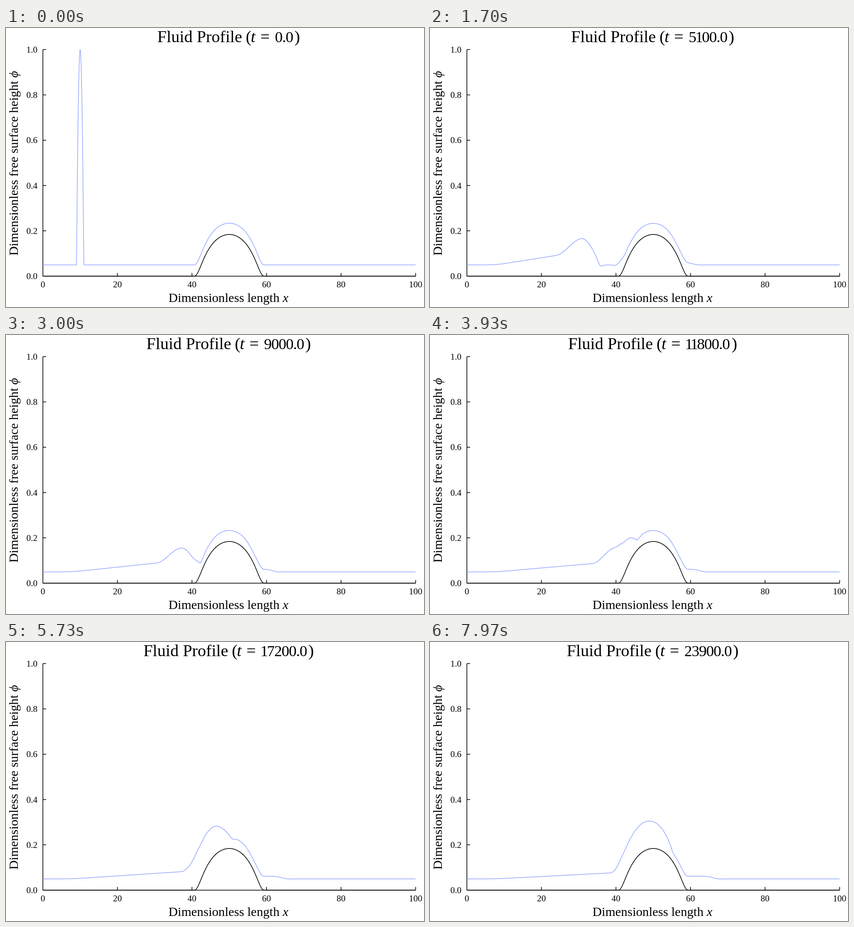
Recreate the animation shown at these times as an HTML page. Size 917x611 px, loop 8000 ms.

```html
<!DOCTYPE html>
<html lang="en">
<head>
<meta charset="utf-8">
<title>Fluid Profile</title>
<style>
html, body { margin: 0; width: 100%; height: 100%; overflow: hidden; background: #fff; }
svg { display: block; width: 100vw; height: 100vh; }
text { font-family: "Liberation Serif", "Noto Serif", serif; white-space: pre; }
.tick { font-size: 19.5px; }
.label { font-size: 28.2px; }
.title { font-size: 36.6px; }
.number { font-size: 34px; letter-spacing: -1px; }
.math { font-style: italic; }
path { fill: none; stroke: #000; stroke-width: 1.5; stroke-linejoin: round; }
#film { stroke: #99acff; }
</style>
</head>
<body>
<svg viewBox="0 0 917 611">
  <path id="axes"/>
  <path id="film"/>
  <path id="bed"/>
  <g id="ticks"></g>
  <text class="label" x="356.5" y="600">Dimensionless length <tspan class="math">x</tspan></text>
  <text class="label" transform="translate(26 498.5) rotate(-90)">Dimensionless free surface height <tspan class="math">ϕ</tspan></text>
  <g id="title">
    <text class="title" y="31">Fluid Profile</text>
    <text class="title" x="194" y="31">(</text>
    <text class="title math" x="205" y="31">t</text>
    <text class="title" x="226" y="31">=</text>
    <text class="number" id="time" x="258" y="31"></text>
    <text class="title" id="close" y="31" text-anchor="end">)</text>
  </g>
</svg>
<script>
const el = id => document.getElementById(id);
const X = x => 80.9 + 8.177 * x;
const Y = y => 543.5 - 496.3 * y;
const clamp = z => Math.min(1, Math.max(0, z));
const smooth = z => z * z * (3 - 2 * z);
const bell = (x, c, w) => Math.exp(-(((x - c) / w) ** 2));
const step = z => 1 / (1 + Math.exp(-z));
const softplus = z => Math.log(1 + Math.exp(z));
const softmin = (a, b) => b - 2 * softplus((b - a) / 2);
const GRID = Array.from({ length: 1001 }, (_, i) => i / 10);
const LOOP = 8000, FRAME = 100 / 3, BASE = 0.05;

function trace(f) {
  return 'M' + GRID.map(x => X(x).toFixed(2) + ' ' + Y(f(x)).toFixed(2)).join('L');
}

function bed(x) {
  const u = (x - 50) / 10;
  return Math.abs(u) < 1 ? 0.5 * Math.exp(-1 / (1 - u * u)) : 0;
}

const pulse = x => Math.max(BASE + bed(x), 1 - (x - 10) ** 2);

// Film over the bed, thinning on the hill and draining off its right foot.
function restFilm(x, t) {
  const front = 58.8 + 0.000293 * t;
  const foot = 0.0118 * step((x - 58.1) / 0.4) * step((front - x) / 0.65)
    - 0.001 * bell(x, front + 2.2, 1);
  const sides = 0.012 * bell(x, 41.2, 0.8) - 0.002 * bell(x, 39.5, 0.8)
    - 0.003 * bell(x, 44.5, 1.5) - 0.005 * bell(x, 56, 1.4);
  const top = 0.002 * bell(x, 50, 5) * (1 - Math.exp(-t / 8000));
  return BASE + bed(x) - top + (foot + sides) * (1 - Math.exp(-t / 600));
}

// Sliding drop: a long linear tail, a rise from heel to peak, a steep front
// ending at the toe. Heel and peak get held up at the foot of the hill.
function drop(t) {
  const r = t / 5100, size = Math.min(1, r) ** 0.08;
  const toe = 11 + 24 * Math.log(1 + 1.8 * r ** 0.7);
  const peak = softmin(toe - 5 * size, 42.6);
  const heel = softmin(toe - 11.8 * size, 38.4);
  const span = toe - peak;
  const bulge = 2 + 0.6 * Math.max(0, span - 8.9);
  const height = 0.1177 * (r + 0.06) ** -0.25 + 0.025 * bell(t, 15000, 4500);
  const slope = 0.0026 * r ** -0.72;
  const tail = x => slope * softplus(x - 8);
  const rise = height - tail(peak);
  return x => {
    const body = x < peak
      ? tail(x) + rise * smooth(clamp((x - heel) / (peak - heel)))
      : height * (1 - clamp((x - peak) / span) ** bulge) ** 1.2;
    return body - 0.005 * bell(x, toe + 0.5, 0.7);
  };
}

function drawTitle(t) {
  const text = t.toFixed(1);
  const ones = text.split('1').length - 1;
  const width = 312 + 16 * (text.length - 3) - 3 * ones;
  // Tighten both sides of each narrow "1".
  const dx = [...text].map((c, i) => -1.5 * ((c === '1') + (text[i - 1] === '1')));
  el('time').textContent = text;
  el('time').setAttribute('dx', dx.join(' '));
  el('close').setAttribute('x', width + 1);
  el('title').setAttribute('transform', `translate(${488 - width / 2} 0)`);
}

function drawAxes() {
  let d = `M${X(0)} ${Y(1)}V${Y(0)}H${X(100)}`, labels = '';
  for (let i = 0; i <= 5; i++) {
    const x = X(20 * i), y = Y(i / 5);
    d += `M${x} ${Y(0)}v-7M${X(0)} ${y}h7`;
    labels += `<text class="tick" x="${x}" y="567.5" text-anchor="middle">${20 * i}</text>`
      + `<text class="tick" x="69" y="${y + 6.6}" text-anchor="end">${(i / 5).toFixed(1)}</text>`;
  }
  el('axes').setAttribute('d', d);
  el('ticks').innerHTML = labels;
  el('bed').setAttribute('d', trace(bed));
}

function surface(t) {
  if (t === 0) return pulse;
  const excess = drop(t);
  return x => restFilm(x, t) + excess(x);
}

let shown = -1;
function draw(ms) {
  // Frames start on whole hundredths of a second.
  const n = Math.floor((Math.floor(ms % LOOP / 10) * 10 + 5) / FRAME);
  if (n === shown) return;
  shown = n;
  el('film').setAttribute('d', trace(surface(100 * n)));
  drawTitle(100 * n);
}

drawAxes();
draw(0);
let origin;
requestAnimationFrame(function tick(now) {
  origin ??= now;
  draw(now - origin);
  requestAnimationFrame(tick);
});
</script>
</body>
</html>
```
